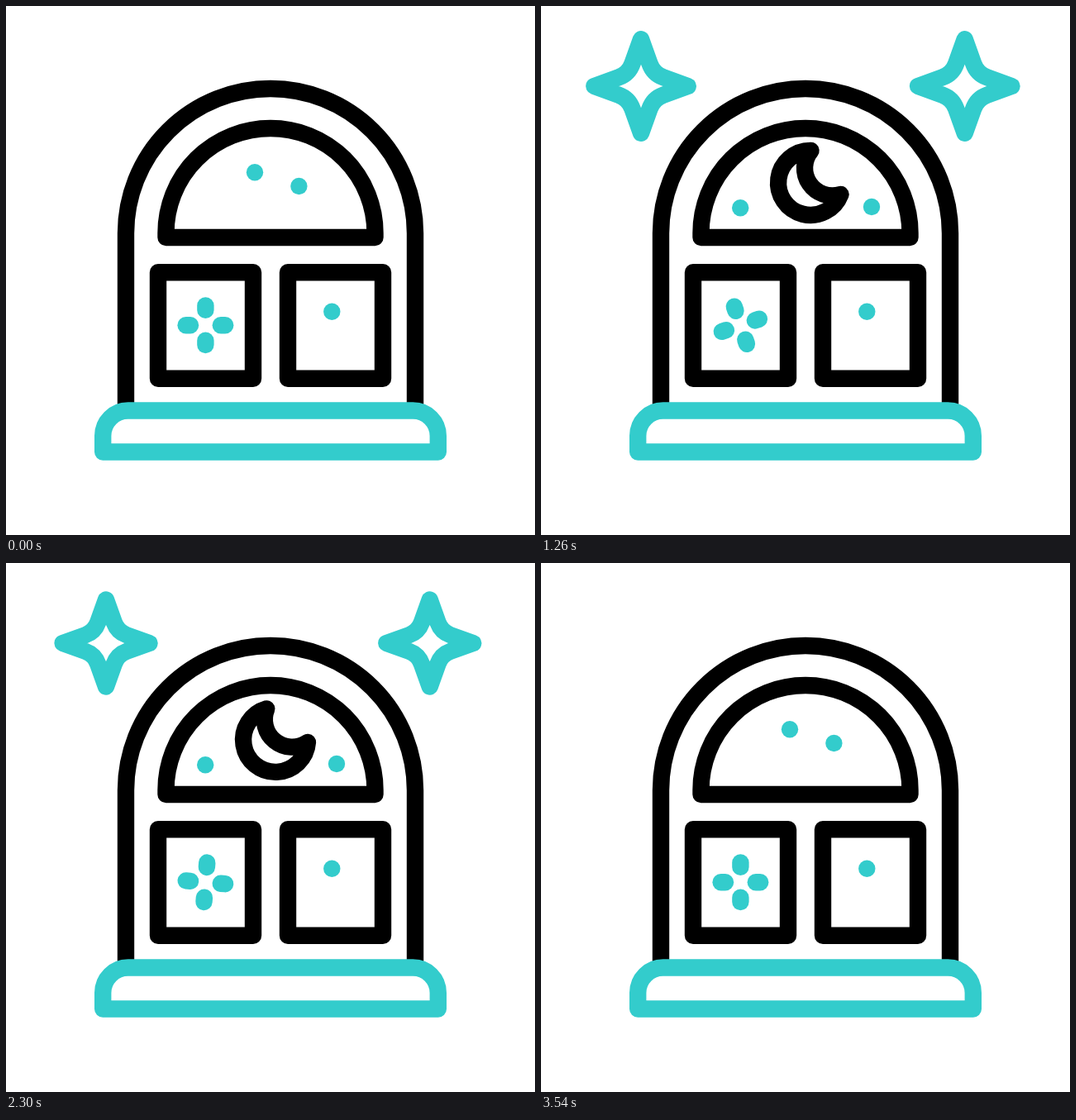
Animation of 640x640 px, one loop 3600 ms. Source, as an HTML page with a canvas:

```html
<!DOCTYPE html>
<html lang="en">
<head>
<meta charset="utf-8">
<title>Night window</title>
<style>
  html, body { margin: 0; width: 100%; height: 100%; overflow: hidden; background: #fff; }
  canvas { display: block; width: 640px; height: 640px; }
</style>
</head>
<body>
<canvas id="stage" width="640" height="640"></canvas>
<script>
const ctx = document.getElementById('stage').getContext('2d');
const LOOP = 3600, BEAT = 600, FIRST_BEAT = 400;
const BLACK = '#000', TEAL = '#33cccc', LINE = 20.4;
const rad = deg => deg * Math.PI / 180;
const clamp = v => Math.min(1, Math.max(0, v));
const ease = v => (1 - Math.cos(Math.PI * clamp(v))) / 2;
const span = (t, from, to) => ease((t - from) / (to - from));

const arch = new Path2D('M145 489V275A175 175 0 0 1 495 275V489');
const fanlight = new Path2D('M193.5 280V274.5A126.5 126.5 0 0 1 446.5 274.5V280Z');
const panes = new Path2D('M184 322.3H299V450.7H184ZM341 322.3H456V450.7H341Z');
const sill = new Path2D('M117.2 539.5V520A30.5 30.5 0 0 1 147.7 489.5H492.3A30.5 30.5 0 0 1 522.8 520V539.5Z');
const crescent = new Path2D('M22.4 -32A39 39 0 1 0 22.4 32A33.4 33.4 0 0 1 22.4 -32Z');

function stroke(path, color) {
  ctx.strokeStyle = color;
  ctx.stroke(path);
}

function placed(x, y, angle, draw) {
  ctx.save();
  ctx.translate(x, y);
  ctx.rotate(angle);
  draw();
  ctx.restore();
}

function dots(...points) {
  ctx.fillStyle = TEAL;
  for (const [x, y] of points) {
    ctx.beginPath();
    ctx.arc(x, y, 10.2, 0, 2 * Math.PI);
    ctx.fill();
  }
}

// The path pulses while its line weight stays constant.
function sparkle(x, size, presence) {
  if (presence < 0.005) return;
  const p = new Path2D();
  p.moveTo(0, -64.5 * size);
  for (let i = 0; i < 4; i++) {
    const c = Math.round(Math.cos(i * Math.PI / 2)), s = Math.round(Math.sin(i * Math.PI / 2));
    const at = (px, py) => [(px * c - py * s) * size, (px * s + py * c) * size];
    p.lineTo(...at(12, -31));
    p.quadraticCurveTo(...at(17, -17), ...at(31, -12));
    p.lineTo(...at(64.5, 0));
  }
  p.closePath();
  placed(x, 97, 0, () => {
    ctx.scale(presence, presence);
    stroke(p, TEAL);
  });
}

function moon(t) {
  const offset = -166 * (1 - span(t, 200, 800)) + 166 * span(t, 2880, 3460);
  if (Math.abs(offset) > 165) return;
  const swing = -47 + 21 * Math.cos(2 * Math.PI * (t - 236) / (2 * BEAT));
  ctx.save();
  ctx.clip(fanlight);
  placed(326, 214, rad(swing + offset * 0.21), () => stroke(crescent, BLACK));
  ctx.restore();
}

function flower(t) {
  const turn = 1260 * clamp((t - 90) / 3420);
  const petal = new Path2D('M0 -23.8V-18.4');
  for (let i = 0; i < 4; i++) {
    placed(241.4, 386.3, rad(turn + 90 * i), () => stroke(petal, TEAL));
  }
}

function draw(t) {
  ctx.fillStyle = '#fff';
  ctx.fillRect(0, 0, 640, 640);
  ctx.lineWidth = LINE;
  ctx.lineCap = ctx.lineJoin = 'round';

  const beat = (t - FIRST_BEAT) / BEAT;
  const pulse = t < FIRST_BEAT ? 1 : 0.9 + 0.1 * Math.cos(Math.PI * beat);
  const presence = span(t, 0, FIRST_BEAT) * (1 - span(t, 3220, 3520));
  sparkle(121, pulse, presence);
  sparkle(512.7, pulse, presence);

  moon(t);
  if (Math.floor(beat) % 2 !== 0) {
    const moonless = t < FIRST_BEAT || t >= 3400;
    dots([394.3, 369.8], ...(moonless ? [[301, 201.3], [354.4, 218]] : [[241.2, 244.3], [400, 243]]));
  }
  flower(t);

  ctx.lineCap = 'butt';
  stroke(arch, BLACK);
  stroke(fanlight, BLACK);
  stroke(panes, BLACK);
  ctx.fillStyle = '#fff';
  ctx.fill(sill);
  stroke(sill, TEAL);
}

const start = performance.now();
function tick() {
  draw((performance.now() - start) % LOOP);
  requestAnimationFrame(tick);
}
tick();
</script>
</body>
</html>
```
